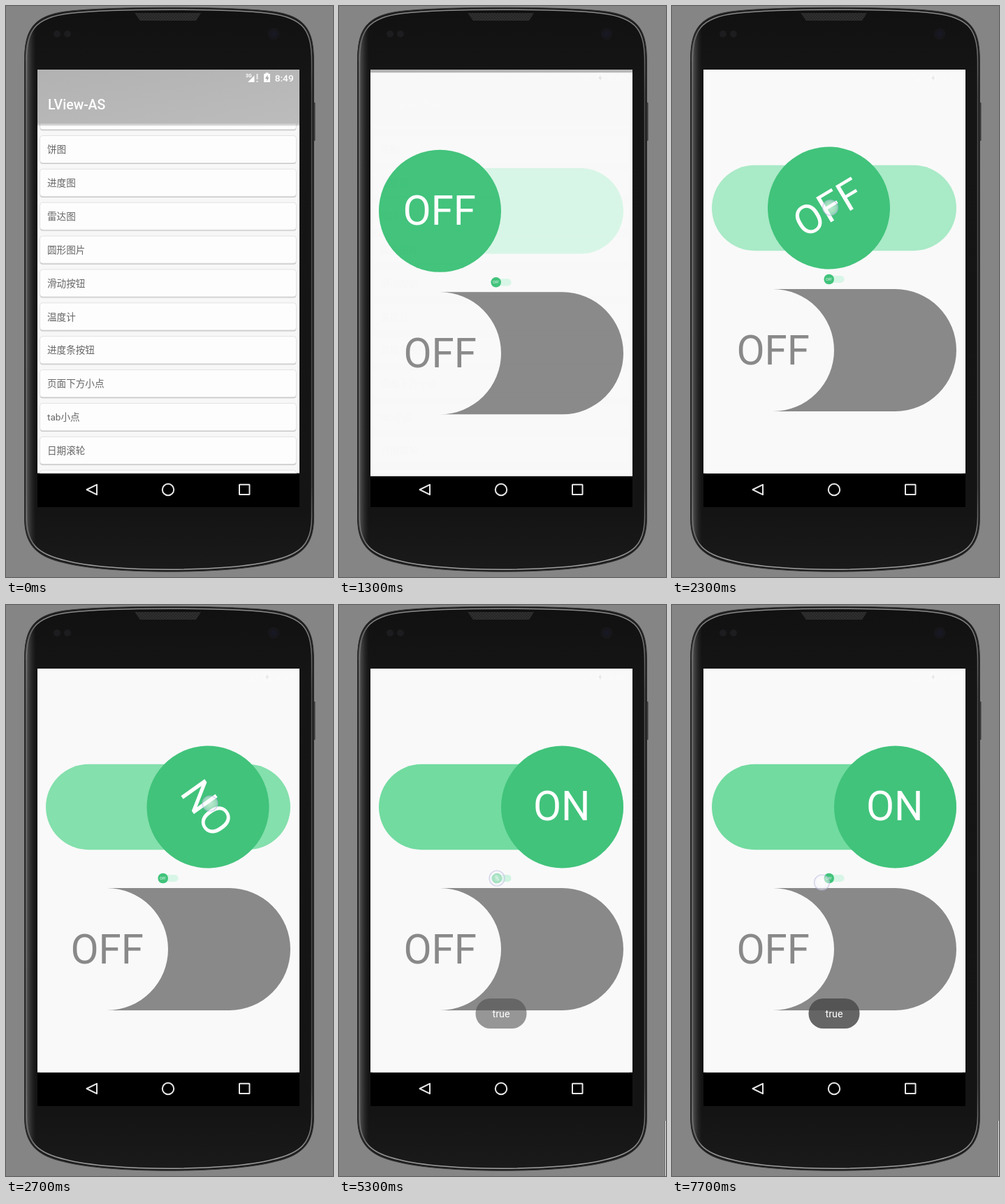
Animation of 468 by 817 pixels, one loop 8 s. Source, as an HTML page:

```html
<!DOCTYPE html>
<html lang="zh-CN">
<head>
<meta charset="utf-8">
<title>LView-AS</title>
<style>
html, body { margin: 0; width: 100%; height: 100%; overflow: hidden; background: #858585; }
svg { display: block; width: 468px; height: 817px; font-family: Roboto, "Noto Sans CJK SC", sans-serif; }
.label { font: 13.6px Roboto, "Noto Sans CJK SC", "Noto Sans CJK", sans-serif; fill: #666; }
.state { font-size: 58.3px; text-anchor: middle; }
</style>
</head>
<body>
<svg viewBox="0 0 468 817" xmlns="http://www.w3.org/2000/svg">
  <defs>
    <linearGradient id="face" x1="0" y1="0" x2="0" y2="1">
      <stop offset="0" stop-color="#111"/><stop offset=".12" stop-color="#151515"/>
      <stop offset=".9" stop-color="#141414"/><stop offset="1" stop-color="#1a1a1a"/>
    </linearGradient>
    <linearGradient id="rim" x1="0" y1="0" x2="0" y2="1">
      <stop offset="0" stop-color="#8c8c8c"/><stop offset=".15" stop-color="#505050"/>
      <stop offset=".85" stop-color="#484848"/><stop offset="1" stop-color="#a0a0a0"/>
    </linearGradient>
    <linearGradient id="bevel" gradientUnits="userSpaceOnUse" x1="28" y1="0" x2="43" y2="0">
      <stop offset="0" stop-color="#777" stop-opacity=".75"/>
      <stop offset=".45" stop-color="#555" stop-opacity=".45"/>
      <stop offset="1" stop-color="#333" stop-opacity="0"/>
    </linearGradient>
    <linearGradient id="bar" x1="0" y1="0" x2="1" y2="1">
      <stop offset="0" stop-color="#b2b2b2"/><stop offset="1" stop-color="#bcbcbc"/>
    </linearGradient>
    <linearGradient id="drop" x1="0" y1="0" x2="0" y2="1">
      <stop offset="0" stop-opacity=".26"/><stop offset="1" stop-opacity="0"/>
    </linearGradient>
    <radialGradient id="touch">
      <stop offset="0" stop-color="#fff" stop-opacity=".66"/>
      <stop offset=".75" stop-color="#f8f8fc" stop-opacity=".5"/>
      <stop offset="1" stop-color="#e4e4f2" stop-opacity=".42"/>
    </radialGradient>
    <pattern id="mesh" width="4" height="4" patternUnits="userSpaceOnUse">
      <rect width="4" height="4" fill="#262626"/>
      <circle cx="1" cy="1" r=".8" fill="#3d3d3d"/><circle cx="3" cy="3" r=".8" fill="#3d3d3d"/>
    </pattern>
    <clipPath id="screen"><rect x="45" y="91" width="375" height="626"/></clipPath>
    <clipPath id="list"><rect x="45" y="168" width="375" height="500.5"/></clipPath>
  </defs>

  <rect width="468" height="817" fill="#858585"/>
  <rect x="440" y="138" width="2.5" height="55" rx="1" fill="#3a3a3a"/>
  <g id="phone"></g>
  <path d="M184 10H279L272 21H192Z" fill="url(#mesh)"/>
  <g fill="#1d1d20">
    <circle cx="73" cy="40" r="5"/><circle cx="88" cy="40" r="5"/>
    <circle cx="383" cy="40" r="8.5" fill="#17171b"/><circle cx="383" cy="40" r="4.5" fill="#181822"/>
  </g>

  <g clip-path="url(#screen)">
    <rect x="45" y="91" width="375" height="626"/>
    <g>
      <rect x="45" y="168" width="375" height="500.5" fill="#f7f7f7"/>
      <g id="rows" clip-path="url(#list)"></g>
      <rect x="45" y="168.500" width="375" height="4" fill="url(#drop)"/>
      <rect x="45" y="91" width="375" height="77.500" fill="url(#bar)"/>
      <text x="60" y="148" font-size="19.5" font-weight="500" fill="#fff">LView-AS</text>
    </g>

    <g id="sheet">
      <rect x="45" y="91" width="375" height="577.500" fill="#f9f9f9"/>
      <g id="big"></g>
      <g id="mini"></g>
      <path d="M144.5 405H319.5A87.5 87.5 0 0 1 319.5 580H144.5A87.5 87.5 0 0 0 144.5 405Z" fill="#898989"/>
      <text class="state" x="144.7" y="513" fill="#898989">OFF</text>
    </g>

    <g id="status" fill="#fff">
      <text x="343" y="102" font-size="7" font-weight="700">3G</text>
      <path d="M346 109L355.5 99.500V109Z"/>
      <path d="M358.500 97H360.500V105H358.500ZM358.500 107H360.500V109H358.500Z" opacity=".75"/>
      <path d="M371.500 95.500H375.500V97H378V109H369V97H371.500Z"/>
      <path d="M374.500 98.500L371 104H373.300V107.500L376.500 102.300H374.500Z" fill="#aaa"/>
      <text x="384.700" y="108" font-size="13.700" font-weight="500">8:49</text>
    </g>
    <g fill="none" stroke="#e6e6e6" stroke-width="2">
      <path d="M115.500 692L130 684.800V699.200Z" stroke-linejoin="round"/>
      <circle cx="232" cy="692" r="8.200"/>
      <rect x="334" y="684.800" width="14.500" height="14.200" rx=".5"/>
    </g>

    <g id="toast">
      <rect x="195.500" y="563" width="73" height="43" rx="21" fill="#4c4c4c" fill-opacity=".85"/>
      <text x="232" y="590" font-size="14.300" text-anchor="middle" fill="#fff">true</text>
    </g>
    <circle id="finger" r="11" fill="url(#touch)" stroke="#b4b4e0" stroke-opacity=".55" stroke-width="1.2"/>
  </g>

  <g id="edge">
    <rect x="466" y="738" width="1" height="79" fill="#707070"/>
    <rect x="467" y="738" width="1" height="79" fill="#e8e8e8"/>
  </g>
</svg>

<script>
const LOOP = 8000, STEP = 100;
const $ = id => document.getElementById(id);
const clamp = v => Math.min(1, Math.max(0, v));
const mix = (a, b, p) => a + (b - a) * p;

// Phone outline, shrunk by d pixels on every side
function outline(d) {
  const l = 26 + d, r = 441 - d, t = d, b = 810 - d;
  return `M${l} 80C${l} 36 ${l + 10} ${t + 13} ${l + 62} ${t + 7}` +
    `C${l + 124} ${t} ${r - 124} ${t} ${r - 62} ${t + 7}C${r - 10} ${t + 13} ${r} 36 ${r} 80` +
    `V732C${r} 770 ${r - 16} ${b - 22} ${r - 56} ${b - 13}` +
    `C${r - 120} ${b + 4} ${l + 120} ${b + 4} ${l + 56} ${b - 13}C${l + 16} ${b - 22} ${l} 770 ${l} 732Z`;
}
$('phone').innerHTML =
  `<path d="${outline(.5)}" fill="#1e1e1e" stroke="#303030"/>` +
  `<path d="${outline(3.5)}" fill="url(#face)" stroke="url(#rim)" stroke-width="1.5"/>` +
  `<path d="${outline(2)}" fill="url(#bevel)"/>`;

const items = ['', '饼图', '进度图', '雷达图', '圆形图片', '滑动按钮', '温度计',
  '进度条按钮', '页面下方小点', 'tab小点', '日期滚轮', ''];
const card = (y, dy, fill) =>
  `<rect x="48.500" y="${y + dy}" width="367" height="39" rx="4" ${fill}/>`;
$('rows').innerHTML = items.map((name, i) => {
  const y = 137.6 + i * 47.87;
  return card(y, 1.6, 'fill="#c8c8c8"') +
    card(y, 0, 'fill="#fdfdfd" stroke="#e2e2e2"') +
    `<text class="label" x="59" y="${y + 24.7}">${name}</text>`;
}).join('');

// Rolling switch, drawn 350 wide around its own centre
function makeSwitch(id, x, y, scale) {
  const g = $(id);
  g.setAttribute('transform', `translate(${x} ${y}) scale(${scale})`);
  g.innerHTML = '<rect x="-175" y="-61.25" width="350" height="122.5" rx="61.25"/>' +
    '<g><circle r="87.500" fill="#41c37b"/><text class="state" x="-.7" y="19.200" fill="#fff"></text></g>';
  const [track, knob] = g.children, text = knob.lastChild;
  const off = [216, 246, 231], on = [114, 219, 160];
  return p => {
    track.setAttribute('fill', `rgb(${off.map((c, i) => Math.round(mix(c, on[i], p)))})`);
    knob.setAttribute('transform', `translate(${mix(-87.5, 87.5, p)}) rotate(${720 * p})`);
    text.textContent = p > .5 ? 'ON' : 'OFF';
  };
}
const setBig = makeSwitch('big', 232, 289, 1);
const setMini = makeSwitch('mini', 232, 391, 1 / 12);

// Keyframes: [time, value, value...], linear between
function at(keys, t) {
  const i = keys.findIndex(k => k[0] > t);
  if (i < 0) return keys[keys.length - 1].slice(1);
  if (!i) return keys[0].slice(1);
  const a = keys[i - 1], b = keys[i], p = (t - a[0]) / (b[0] - a[0]);
  return a.slice(1).map((v, j) => mix(v, b[j + 1], p));
}

const bigX = [[1800, 144.5], [1900, 160], [2700, 289], [2900, 319.5]];
const miniX = [[5200, 224.7], [5300, 226], [5700, 239.3], [7200, 239.3], [7700, 224.7]];
const toastKeys = [[3200, 0], [3400, .6], [3700, 1], [5100, 1], [5700, 0], [6500, 0], [6700, .7], [6900, 1]];
const touches = [
  { from: 1100, to: 1300, path: [[1100, 185, 397, .9], [1200, 185, 397, .45]] },
  { from: 1900, to: 3200, path: [[1900, 161, 293, 1], [2700, 292, 284, 1], [3000, 330, 282, 1], [3100, 331, 282, .5]] },
  { from: 5300, to: 6600, path: [[5300, 226, 391, 1], [5700, 245, 390.5, 1]] },
  { from: 7200, to: 8000, path: [[7200, 240, 392, 1], [7700, 214.5, 397, 1]] }
];

function draw(t) {
  const age = Math.max(0, t - 1168);
  const fade = 1 - (1 - clamp(age / 200)) ** 4;
  const shift = 46 * (1 - clamp(age / 350)) ** 5;
  $('sheet').setAttribute('opacity', fade);
  $('sheet').setAttribute('transform', `translate(0 ${shift})`);
  $('status').setAttribute('opacity', 1 - .8 * fade ** 4);

  setBig((at(bigX, t)[0] - 144.5) / 175);
  setMini((at(miniX, t)[0] - 224.7) / 14.6);
  $('toast').setAttribute('opacity', at(toastKeys, t)[0]);
  $('edge').setAttribute('opacity', t >= 3300 ? 1 : 0);

  const touch = touches.find(k => t >= k.from && t < k.to);
  const [x, y, alpha] = touch ? at(touch.path, t) : [0, 0, 0];
  const finger = $('finger');
  finger.setAttribute('cx', x);
  finger.setAttribute('cy', y);
  finger.setAttribute('opacity', alpha);
}

const start = performance.now();
function tick() {
  const t = (performance.now() - start) % LOOP;
  draw(Math.floor(t / STEP) * STEP);
  requestAnimationFrame(tick);
}
tick();
</script>
</body>
</html>
```
